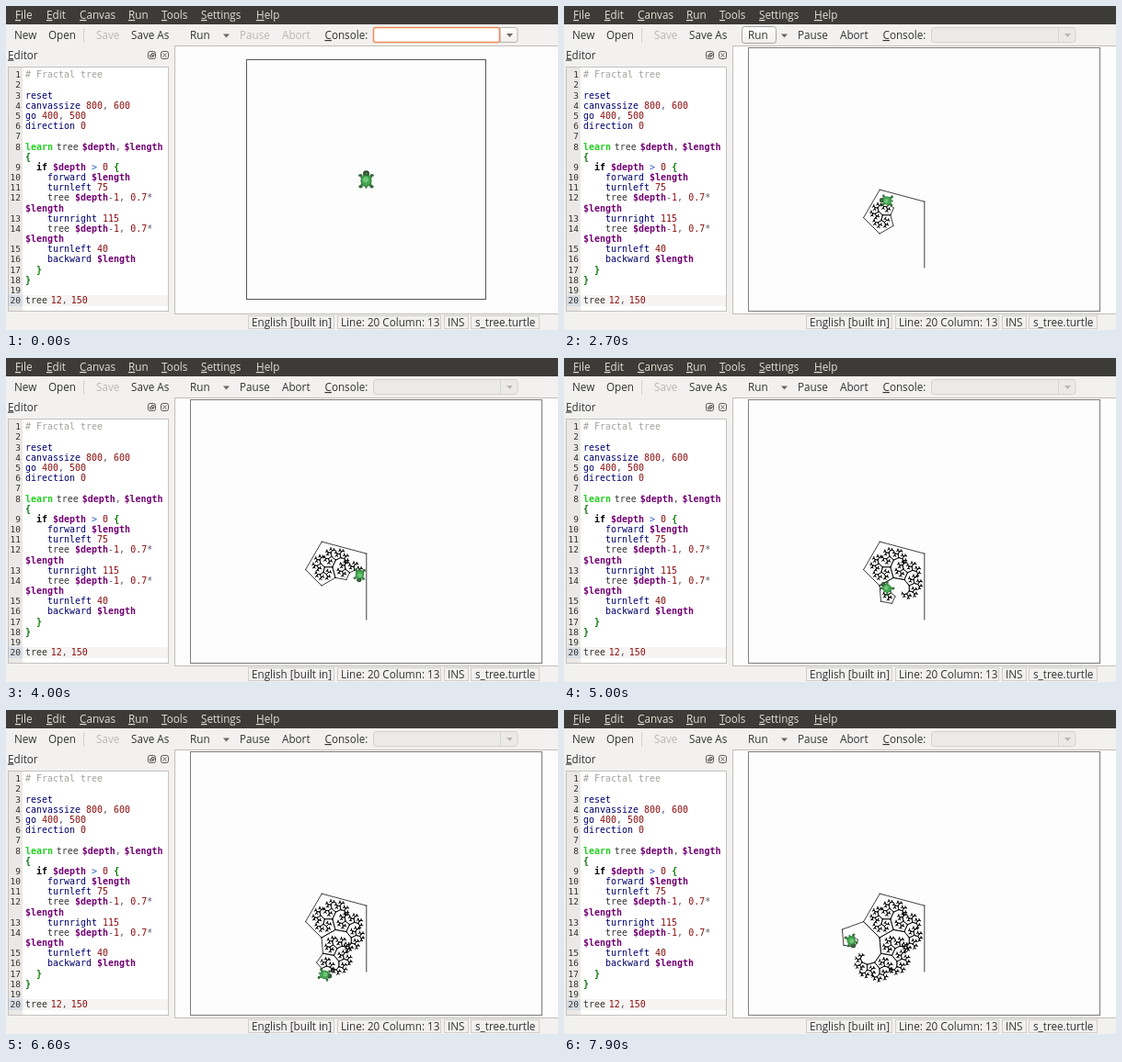
An HTML page with a canvas for the animation above (8 s loop, 600 by 353 pixels).

```html
<!DOCTYPE html>
<html lang="en">
<head>
<meta charset="utf-8">
<title>Fractal tree</title>
<style>
  html, body { margin: 0; width: 600px; height: 353px; overflow: hidden; background: #f2f1f0; }
  svg, canvas { position: absolute; left: 0; top: 0; display: block; }
  text { font: 11.7px "Open Sans", "Noto Sans", sans-serif; fill: #333; white-space: pre; }
  .menu text { fill: #e4e0d8; }
  .u { text-decoration: underline; }
  .off text, text.off { fill: #bcb7b1; }
  .code text { font: 9.97px "DejaVu Sans Mono", monospace; }
  .code .tight { word-spacing: -2.2px; }
  .code .cmt { fill: #a5a19c; }
  .code .cmd { fill: #00006e; }
  .code .num { fill: #8c1010; }
  .code .var { fill: #720072; font-weight: bold; }
  .code .brace { fill: #0a7a0a; font-weight: bold; }
  .code .learn { fill: #1ed01e; font-weight: bold; }
  .code .if { fill: #000; font-weight: bold; }
  .code .op { fill: #55556a; }
  .code .cmp { fill: #2f5fd0; }
  .code .no { font-size: 9.5px; text-anchor: end; fill: #33302c; }
  .panel { fill: none; stroke: #d2cec9; }
</style>
</head>
<body>
<svg width="600" height="353" viewBox="0 0 600 353">
  <defs>
    <linearGradient id="light" x2="0" y2="1"><stop stop-color="#fff"/><stop offset="1" stop-color="#f1efed"/></linearGradient>
    <linearGradient id="dark" x2="0" y2="1"><stop stop-color="#d6d2ce"/><stop offset="1" stop-color="#e9e6e3"/></linearGradient>
  </defs>
  <rect width="600" height="353" fill="#f2f1f0"/>
  <rect width="600" height="20" fill="#3c3b37"/>
  <g class="menu" id="menu"></g>

  <path d="M84.5 24V40" stroke="#d5d1cc"/>
  <text x="9" y="36">New</text>
  <text x="46" y="36">Open</text>
  <text x="98" y="36" class="off">Save</text>
  <text x="136" y="36">Save As</text>
  <rect id="hover" x="193.5" y="22.5" width="37" height="18" rx="3" fill="url(#light)" stroke="#aaa59f"/>
  <rect id="press" x="193.5" y="23.5" width="37" height="17" rx="3" fill="url(#dark)" stroke="#a09b95"/>
  <text x="200" y="36">Run</text>
  <path d="M236 30.5h7l-3.5 4z" fill="#6b6762"/>
  <g id="stop"><text x="254" y="36">Pause</text><text x="300" y="36">Abort</text></g>
  <text x="346.5" y="36"><tspan class="u">C</tspan>onsole:</text>
  <g id="ready">
    <path d="M537 23.5H553a3 3 0 0 1 3 3V36.5a3 3 0 0 1-3 3H537z" fill="url(#light)" stroke="#b9b4ae"/>
    <rect x="399.5" y="23.5" width="137" height="16" rx="2" fill="#fff" stroke="#ee8a5c" stroke-width="1.5"/>
    <path d="M544 30h7l-3.5 4z" fill="#6b6762"/>
  </g>
  <g id="busy">
    <rect x="399.5" y="23.5" width="156.5" height="16" rx="3" fill="#eceae8" stroke="#d6d2cd"/>
    <path d="M537.5 24V39" stroke="#d9d5d0"/>
    <path d="M544 30h7l-3.5 4z" fill="#bcb7b1"/>
  </g>
  <path id="caret" d="M403 25V37" stroke="#222"/>

  <text x="2" y="57.5"><tspan class="u">E</tspan>ditor</text>
  <g fill="none" stroke="#5c5854">
    <rect x="154.5" y="49.5" width="8" height="8" rx="2"/>
    <path d="M156.5 53.5h3v2h-3zM158.5 53V51.5h2.5v3H160"/>
    <rect x="168.5" y="49.5" width="8" height="8" rx="2"/>
    <path d="M170.5 51.5l4 4m0-4l-4 4"/>
  </g>

  <rect x="2.5" y="66.5" width="174" height="266" fill="#fff" stroke="#c5c1bc"/>
  <rect x="3" y="67" width="15" height="265" fill="#ebe9e7"/>
  <rect x="3" y="315" width="15" height="12" fill="#d8dde5"/>
  <rect x="18" y="315" width="158" height="12" fill="#f5f4f3"/>
  <g class="code" id="code"></g>

  <rect x="183.5" y="43.5" width="417" height="292" fill="#fdfdfd" stroke="#c2beb9"/>

  <rect class="panel" x="263.5" y="337.5" width="93" height="14"/>
  <rect class="panel" x="360.5" y="337.5" width="112" height="14"/>
  <rect class="panel" x="476.5" y="337.5" width="26" height="14"/>
  <rect class="panel" x="505.5" y="337.5" width="74" height="14"/>
  <text x="267" y="349">English [built in]</text>
  <text x="364" y="349">Line: 20 Column: 13</text>
  <text x="480" y="349">INS</text>
  <text x="510" y="349">s_tree.turtle</text>
</svg>
<canvas id="stage" width="600" height="353"></canvas>
<script>
const $ = id => document.getElementById(id);

$('menu').innerHTML = [['File', 10], ['Edit', 44], ['Canvas', 80], ['Run', 133], ['Tools', 169], ['Settings', 212], ['Help', 272]]
  .map(([s, x]) => `<text x="${x}" y="14"><tspan class="u">${s[0]}</tspan>${s.slice(1)}</text>`).join('');

// A leading "~" marks the continuation of a wrapped line.
const program = `# Fractal tree

reset
canvassize 800, 600
go 400, 500
direction 0

learn tree $depth, $length
~{
  if $depth > 0 {
    forward $length
    turnleft 75
    tree $depth-1, 0.7*
~$length
    turnright 115
    tree $depth-1, 0.7*
~$length
    turnleft 40
    backward $length
  }
}

tree 12, 150`;

const kinds = [
  ['cmt', /^#.*/], ['var', /^\$\w+/], ['num', /^[\d.]+/], ['brace', /^[{}]/], ['learn', /^learn/], ['if', /^if/],
  ['cmd', /^(reset|canvassize|go|direction|forward|backward|turnleft|turnright)/],
  ['id', /^\w+/], ['cmp', /^>/], ['op', /^[-*,]/], ['gap', /^\s+/]
];

function paint(line) {
  let out = '';
  while (line) {
    const [kind, rule] = kinds.find(k => k[1].test(line));
    const word = line.match(rule)[0];
    out += `<tspan class="${kind}">${word.replace('>', '&gt;')}</tspan>`;
    line = line.slice(word.length);
  }
  return out;
}

let lineNo = 0;
$('code').innerHTML = program.split('\n').map((line, i) => {
  const y = (78.2 + i * 11.18).toFixed(1);
  const wrapped = line[0] === '~';
  const label = wrapped ? '' : `<text class="no" x="16" y="${y}">${++lineNo}</text>`;
  const spacing = /^(learn|tree)/.test(line) ? 'tight' : '';
  return `${label}<text class="${spacing}" x="21" y="${y}">${paint(wrapped ? line.slice(1) : line)}</text>`;
}).join('');

// Every move of the program, in stage pixels.
const SCALE = 0.479;
const states = [{ x: 391.8, y: 285, dir: 0 }];

function move(dir, len) {
  const { x, y } = states[states.length - 1];
  const a = dir * Math.PI / 180;
  states.push({ x: x + Math.sin(a) * len, y: y - Math.cos(a) * len, dir });
}

function tree(depth, len, dir) {
  if (depth === 0) return;
  move(dir, len);
  tree(depth - 1, len * 0.7, dir - 75);
  tree(depth - 1, len * 0.7, dir + 40);
  move(dir, -len);
}
tree(12, 150 * SCALE, 0);

// [time, moves done]
const pace = [[2200, 30], [2700, 166], [3000, 226], [3900, 355], [4000, 377], [4800, 513], [5000, 557],
  [5700, 674], [6600, 835], [7500, 977], [7800, 1024], [7900, 1032]];

function movesAt(t) {
  const i = pace.findIndex(p => p[0] >= t);
  if (i <= 0) return pace[i < 0 ? pace.length - 1 : 0][1];
  const [t0, n0] = pace[i - 1], [t1, n1] = pace[i];
  return Math.round(n0 + (n1 - n0) * (t - t0) / (t1 - t0));
}

const ctx = $('stage').getContext('2d');

function blob(x, y, rx, ry, fill) {
  ctx.fillStyle = fill;
  ctx.beginPath();
  ctx.ellipse(x, y, rx, ry, 0, 0, Math.PI * 2);
  ctx.fill();
}

function turtle(x, y, dir, size) {
  ctx.save();
  ctx.translate(x, y);
  ctx.rotate(dir * Math.PI / 180);
  ctx.scale(size, size);
  for (const s of [-1, 1]) {
    blob(s * 6.2, -4.5, 2.2, 1.6, '#35693a');
    blob(s * 6, 7.7, 2.2, 1.8, '#35693a');
    blob(s * 4.8, -2.5, 1.5, 1.5, '#3f8446');
    blob(s * 4.6, 5.8, 1.5, 1.5, '#3f8446');
  }
  blob(0, 8.5, 1, 1.4, '#35693a');
  blob(0, -6.3, 3.5, 3.4, '#264c2c');
  blob(0, -6.5, 2, 1.8, '#427245');
  blob(0, 1.5, 6.1, 6.4, '#2f7a38');
  blob(0, 1.3, 5.2, 5.5, '#43a851');
  blob(-0.5, 0.2, 3, 3, '#74c77a');
  ctx.restore();
}

function frame(x, y, w, h, line) {
  ctx.fillStyle = '#fdfdfd';
  ctx.fillRect(x, y, w, h);
  ctx.strokeStyle = line;
  ctx.lineWidth = 1;
  ctx.strokeRect(x, y, w, h);
}

// Each move is stroked alone: going back over a branch darkens it.
function drawTree(n) {
  ctx.strokeStyle = '#000';
  ctx.lineWidth = 0.75;
  ctx.lineCap = 'square';
  for (let i = 1; i <= n; i++) {
    ctx.beginPath();
    ctx.moveTo(states[i - 1].x, states[i - 1].y);
    ctx.lineTo(states[i].x, states[i].y);
    ctx.stroke();
  }
  turtle(states[n].x, states[n].y, states[n].dir, 0.76);
}

const show = (id, on) => { $(id).style.display = on ? '' : 'none'; };
const within = (t, a, b) => t >= a && t < b;

let last = -1;
function tick() {
  const t = Math.floor(performance.now() % 8000 / 100) * 100;
  if (t !== last) {
    last = t;
    const running = t >= 2200;
    show('hover', within(t, 900, 2000) || within(t, 2200, 2900));
    show('press', within(t, 2000, 2200));
    show('caret', within(t, 200, 900) || within(t, 1400, 1900));
    show('ready', !running);
    show('busy', running);
    $('stop').setAttribute('class', running ? '' : 'off');
    ctx.clearRect(0, 0, 600, 353);
    if (running) {
      frame(200.5, 45.5, 382, 287, '#7c7c7c');
      drawTree(movesAt(t));
    } else {
      frame(261.5, 58.5, 260, 261, '#555');
      turtle(391.5, 189, 0, 1);
    }
  }
  requestAnimationFrame(tick);
}
tick();
</script>
</body>
</html>
```
